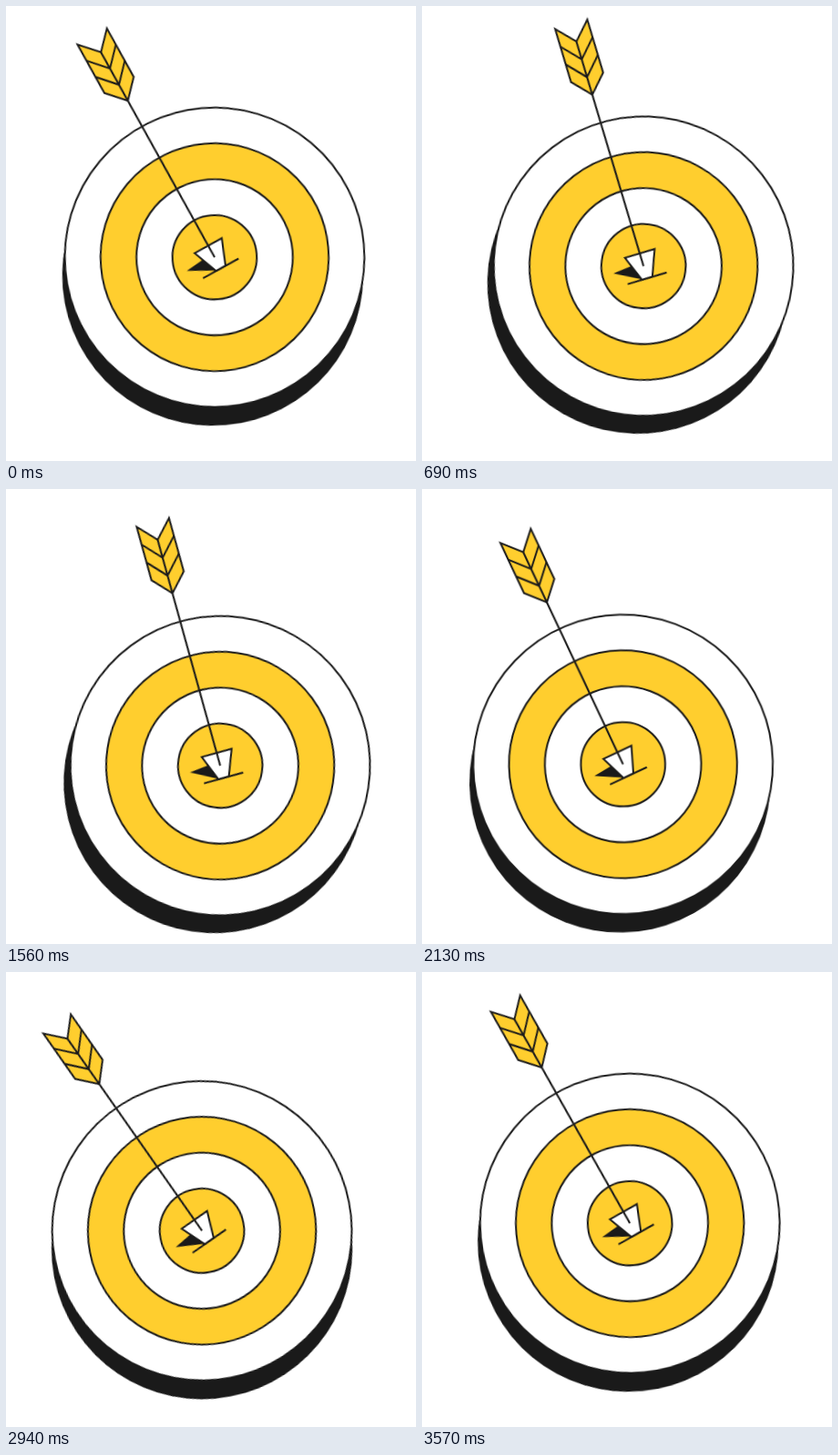
Write an HTML page that moves like this. It is 450 px wide and 500 px high and loops after 3600 ms.

```html
<!DOCTYPE html>
<html lang="en">
<head>
<meta charset="utf-8">
<title>Target</title>
<style>
  html, body { margin: 0; width: 100%; height: 100%; overflow: hidden; background: #fff; }
  svg { display: block; width: 450px; height: 500px; }

  .yellow { fill: #ffce2e; }
  .white { fill: #fff; }
  .dark { fill: #1a1a1a; }
  .line { stroke: #1a1a1a; stroke-width: 2; }
  .open { fill: none; }

  /* Half a sine wave each way; the delays set the phases. */
  .x, .y, .sway {
    animation: 1800ms cubic-bezier(.3642, 0, .6358, 1) infinite alternate;
    transform-origin: 0 0;
  }
  .x { animation-name: x; animation-delay: -900ms; }
  .y { animation-name: y; animation-delay: -17ms; }
  .sway { animation-name: sway; animation-delay: -630ms; }

  @keyframes x {
    from { transform: translateX(213.75px); }
    to { transform: translateX(244.15px); }
  }
  @keyframes y {
    from { transform: translateY(276.1px); }
    to { transform: translateY(305.1px); }
  }
  @keyframes sway {
    from { transform: rotate(-11deg); }
    to { transform: rotate(11deg); }
  }
</style>
</head>
<body>
<svg viewBox="0 0 450 500">
  <g class="x"><g class="y"><g class="sway">
    <circle class="dark" cx="-3.8" cy="19.6" r="165.2"/>
    <g class="line">
      <circle class="white" r="164.4"/>
      <circle class="yellow" r="125.2"/>
      <circle class="white" r="85.8"/>
      <circle class="yellow" r="46.3"/>
    </g>
    <g transform="rotate(-24)">
      <path class="dark" d="M-34 -1.7 L-13 -3.8 L-5 14Z"/>
      <g class="line">
        <path class="open" d="M-22.3 14H22.3"/>
        <path class="white" d="M-17 -14.5H17L6 13.8H-6Z"/>
        <path class="yellow" d="M0 -257.5L18.4 -277.3V-216.5L0 -196.5L-18.4 -216.5V-277.3Z"/>
        <path class="open" d="M0 0V-257.5M-18.4 -257L0 -237L18.4 -257M-18.4 -236.7L0 -216.7L18.4 -236.7"/>
      </g>
    </g>
  </g></g></g>
</svg>
</body>
</html>
```
